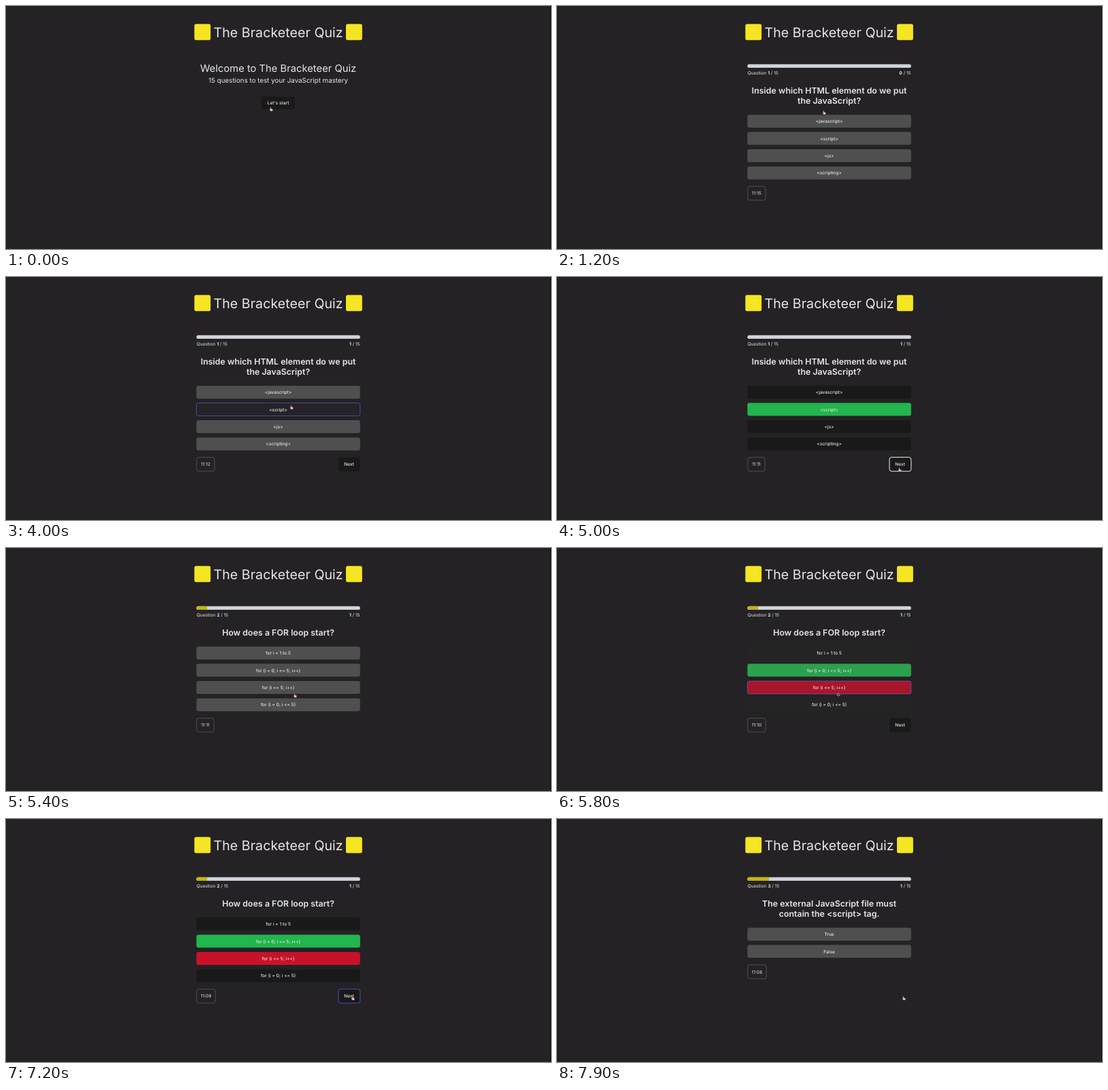
These frames come from a looping animation (800 by 358 pixels, 8 s). An HTML page:

```html
<!DOCTYPE html>
<html lang="en">
<head>
<meta charset="utf-8">
<title>Quiz</title>
<style>
html, body { margin: 0; width: 100%; height: 100%; overflow: hidden; background: #242225; }
svg {
  display: block; width: 800px; height: 358px; fill: #e6e6e6;
  font-family: Inter, sans-serif; font-optical-sizing: none; text-rendering: geometricPrecision;
}
</style>
</head>
<body>
<svg id="stage" viewBox="0 0 800 358"></svg>
<script>
const LOOP = 8000, LEFT = 279.5, RIGHT = 519.8, MID = 399.6, NAME = 'The Bracketeer Quiz';
const BG = [36, 34, 37], GREY = [80, 79, 80], DARK = [26, 25, 26], GREEN = [34, 182, 78], RED = [201, 18, 42];
const BLUE = '#646cff';

// hover: [option, enter, leave]
const questions = [
  { at: 800, title: ['Inside which HTML element do we put', 'the JavaScript?'],
    options: ['<javascript>', '<script>', '<js>', '<scripting>'],
    hovers: [[0, 3000, 3250], [1, 3270, 4550]], right: 1, pick: 1, click: 4000, next: 4850, press: 4950 },
  { at: 5100, title: ['How does a FOR loop start?'],
    options: ['for i = 1 to 5', 'for (i = 0; i <= 5; i++)', 'for (i <= 5; i++)', 'for (i = 0; i <= 5)'],
    hovers: [[2, 5450, 5950]], right: 1, pick: 2, click: 5650, next: 7050, press: 7600 },
  { at: 7650, title: ['The external JavaScript file must', 'contain the <script> tag.'],
    options: ['True', 'False'], hovers: [], click: Infinity }
];

// time, x, y
const path = [
  [0, 389, 152], [200, 389, 152], [700, 392, 157], [2600, 392, 157], [2980, 413, 165], [3120, 413, 166],
  [3450, 419, 192], [4480, 419, 192], [4880, 503, 284], [5050, 503, 284], [5500, 413, 208], [5700, 413, 216],
  [5900, 413, 216], [6250, 527, 262], [6700, 527, 262], [7120, 509, 264], [LOOP, 509, 264]
];

const clamp = x => Math.max(0, Math.min(1, x));
const ramp = (t, start, span = 300) => 1 - (1 - clamp((t - start) / span)) ** 2.3;
const mix = (a, b, p) => a.map((v, i) => v + (b[i] - v) * p);
const rgb = c => `rgb(${c.map(Math.round)})`;
const esc = s => s.replace(/</g, '&lt;').replace(/>/g, '&gt;');

const box = (x, y, w, h, r, fill, extra = '') =>
  `<rect x="${x}" y="${y}" width="${w}" height="${h}" rx="${r}" fill="${fill}" ${extra}/>`;

// y is the middle of the capitals
const text = (s, x, y, size, weight = 400, anchor = 'middle') =>
  `<text x="${x}" y="${y + size * 0.364}" font-size="${size}" font-weight="${weight}" text-anchor="${anchor}">${s}</text>`;

const stroke = (color, opacity = 1, width = 0.8) =>
  `stroke="${color}" stroke-opacity="${opacity}" stroke-width="${width}"`;

function header() {
  return box(276.5, 26.6, 23.8, 23.6, 2.5, '#f5e522') + box(499, 26.6, 23.8, 23.6, 2.5, '#f5e522') +
    text(NAME, MID, 38.6, 19.7);
}

function welcome() {
  return text('Welcome to ' + NAME, MID, 91.6, 14.75) +
    text('15 questions to test your JavaScript mastery', MID, 109.7, 9.8) +
    box(375.2, 133.6, 48.8, 18.6, 3, rgb(DARK)) + text("Let's start", MID, 143, 6.6, 500);
}

function option(q, i, y, t) {
  const answered = t >= q.click;
  let fill = GREY, border = 0, shift = 0;
  for (const [n, enter, leave] of q.hovers) {
    if (n !== i) continue;
    border = ramp(t, enter, 250) - ramp(t, leave, 250);
    fill = mix(GREY, BG, ramp(Math.min(t, q.click), enter) - ramp(Math.min(t, q.click), leave));
    if (!answered && t >= enter && t < leave) shift = 6.6;
  }
  const goal = i === q.right ? GREEN : i === q.pick ? RED : DARK;
  fill = mix(fill, goal, ramp(t, q.click));
  return box(LEFT + shift, y - 9.5, RIGHT - LEFT - shift, 19, 3, rgb(fill), stroke(BLUE, border * 0.7)) +
    text(esc(q.options[i]), MID + shift / 2, y, 6.6, 500);
}

function nextButton(q, y, t) {
  const edge = t >= q.press ? stroke('#f2f2f2', 1, 1) : stroke(BLUE, ramp(t, q.next, 150) * 0.8);
  return box(488, y - 10.3, RIGHT - 488, 20.6, 3, rgb(DARK), edge) + text('Next', 503.6, y, 6.6, 500);
}

function timer(y, t) {
  const left = 675 - Math.floor((t - 800) / 1000);
  const label = Math.floor(left / 60) + ':' + String(left % 60).padStart(2, '0');
  const width = 25.2 + 1.1 * label.replace(/[1:]/g, '').length;
  return box(LEFT + 0.4, y - 10.2, width, 20.4, 3, 'none', stroke('#5a595a')) +
    text(label, LEFT + 0.4 + width / 2, y, 6.6);
}

function quiz(n, t) {
  const q = questions[n], extra = (q.title.length - 1) * 15;
  const score = t >= questions[0].click ? 1 : 0;
  const top = 154.7 + extra, foot = top + (q.options.length - 1) * 25.4 + 30;
  let out = box(LEFT, 85.7, RIGHT - LEFT, 5.3, 2.6, '#d0d3da');
  if (n) out += box(LEFT, 85.7, n * 16, 5.3, 2.6, '#c4b414');
  out += text(`Question <tspan font-weight="700">${n + 1}</tspan> / 15`, LEFT + 0.2, 98.6, 6.6, 400, 'start') +
    text(`<tspan font-weight="700">${score}</tspan> / 15`, RIGHT - 0.3, 98.6, 6.6, 400, 'end');
  q.title.forEach((line, i) => out += text(esc(line), MID, 124.6 + i * 15, 12.4, 600));
  q.options.forEach((_, i) => out += option(q, i, top + i * 25.4, t));
  out += timer(foot, t);
  return t >= q.click ? out + nextButton(q, foot, t) : out;
}

function cursor(t) {
  const k = path.findIndex(p => p[0] > t), a = path[k - 1], b = path[k];
  const u = (t - a[0]) / (b[0] - a[0]), p = u * u * (3 - 2 * u);
  const x = a[1] + (b[1] - a[1]) * p, y = a[2] + (b[2] - a[2]) * p;
  const blocked = (t > 4100 && t < 4500) || (t > 5700 && t < 5950);
  const shape = blocked
    ? `<circle r="2" fill="#242225" ${stroke('#b8b6c0', 1, 0.7)}/><path d="M-1.4-1.4L1.4 1.4" ${stroke('#b8b6c0', 1, 0.7)}/>`
    : `<path d="M-1.2-3q.8-.6 1.1.4l.3 1.8 2 .6q.7.3.5 1.3l-.5 2h-2.7l-2-2.6q.1-.8 1.2-.2z" fill="#f0bfd8" ${stroke('#151015', 1, 0.4)}/>`;
  return `<g transform="translate(${x} ${y})">${shape}</g>`;
}

const stage = document.getElementById('stage');
const start = performance.now();

function draw(now) {
  const t = Math.max(0, now - start) % LOOP;
  const n = questions.filter(q => t >= q.at).length - 1;
  stage.innerHTML = header() + (n < 0 ? welcome() : quiz(n, t)) + cursor(t) + box(799, 0, 1, 358, 0, '#0c0c0c');
  requestAnimationFrame(draw);
}
draw(start);
</script>
</body>
</html>
```
